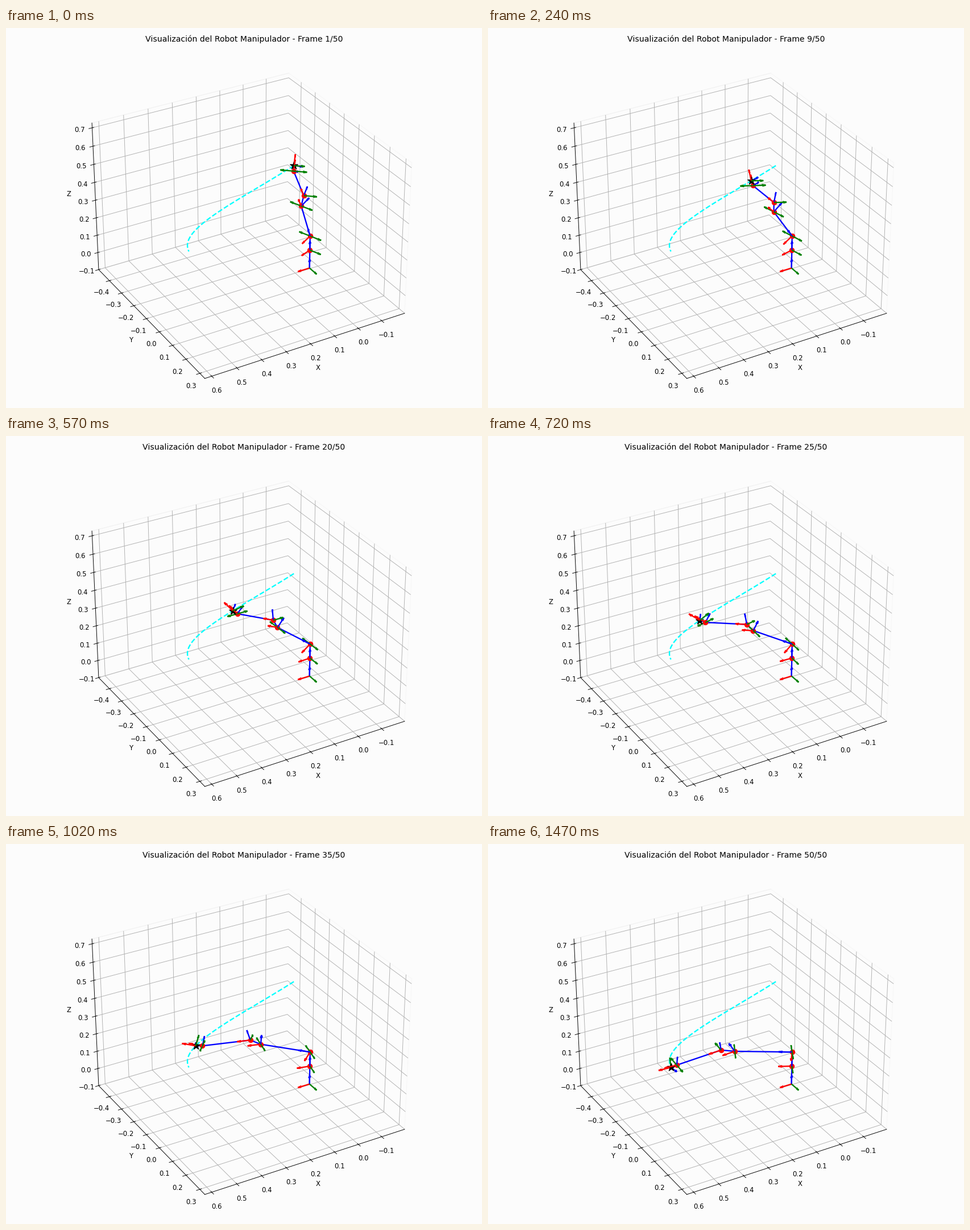
Recreate the animation shown at these times as a matplotlib script. Size 837 by 669 pixels, loop 1.5 s.

```python
import numpy as np
import matplotlib.pyplot as plt
from matplotlib.animation import FuncAnimation
from matplotlib.ticker import MultipleLocator

DPI = 83.7
W, H = 837, 669
STEPS = 50
BACK = "#fcfcfc"
ARROW = 0.05
COLORS = ("red", "green", "blue")

# Each joint: rotation axis, offset from the previous joint (m)
JOINTS = [
    ("z", (0, 0, 0.103)),
    ("y", (0, 0, 0.08)),
    ("y", (0, 0, 0.21)),
    ("x", (0.0415, 0, 0.03)),
    ("y", (0.18, 0, 0)),
    ("x", (0.0237, 0, -0.0055)),
]
START = np.radians([21.4, 15.7, -85.5, 20, -56, -21])
END = np.radians([-27, 86.5, -60.7, 84, -8, 73.5])


def rotation(axis, angle):
    c, s = np.cos(angle), np.sin(angle)
    if axis == "x":
        return np.array([[1, 0, 0], [0, c, -s], [0, s, c]])
    if axis == "y":
        return np.array([[c, 0, s], [0, 1, 0], [-s, 0, c]])
    return np.array([[c, -s, 0], [s, c, 0], [0, 0, 1]])


def pose(step):
    """Origins and orientations of the base and all joints."""
    angles = START + (END - START) * step / (STEPS - 1)
    point, rot = np.zeros(3), np.eye(3)
    points, rots = [point], [rot]
    for (axis, offset), angle in zip(JOINTS, angles):
        point = point + rot @ np.array(offset)
        rot = rot @ rotation(axis, angle)
        points.append(point)
        rots.append(rot)
    return np.array(points), rots


fig = plt.figure(figsize=(W / DPI, H / DPI + 1e-9), dpi=DPI, facecolor=BACK)
ax = fig.add_subplot(projection="3d", facecolor=BACK)
ax.view_init(elev=30, azim=60)
for axis in (ax.xaxis, ax.yaxis, ax.zaxis):
    axis.pane.set_facecolor(BACK)
    axis.set_major_locator(MultipleLocator(0.1))

path = np.array([pose(k)[0][-1] for k in range(STEPS)])
ax.plot(*path.T, color="cyan", linestyle="--", linewidth=2)
arm, = ax.plot([], [], [], color="blue", linewidth=2)

ax.set_xlim(-0.1992, 0.6272)
ax.set_ylim(-0.4906, 0.3358)
ax.set_zlim(-0.1003, 0.7261)
ax.set_xlabel("X")
ax.set_ylabel("Y")
ax.set_zlabel("Z")

moving = []


def arrow(point, direction, color):
    moving.append(ax.quiver(*point, *direction, length=ARROW, color=color,
                            linewidth=2))


def draw(step):
    while moving:
        moving.pop().remove()
    points, rots = pose(step)
    arm.set_data_3d(*points.T)

    for point in points[1:-1]:
        moving.append(ax.scatter(*point, color="red", s=50))
    for point, rot in zip(points, rots):
        for direction, color in zip(rot.T, COLORS):
            arrow(point, direction, color)
    # Pitch joints also show their negative turning axis
    for (axis, _), point, rot in zip(JOINTS, points[1:], rots[1:]):
        if axis == "y":
            arrow(point, -rot[:, 1], "green")
    moving.append(ax.scatter(*points[-1], color="black", marker="*", s=150))

    ax.set_title("Visualización del Robot Manipulador - "
                 f"Frame {step + 1}/{STEPS}")
    return moving


draw(0)
fig.tight_layout()
anim = FuncAnimation(fig, draw, frames=STEPS, interval=30, repeat=True,
                     repeat_delay=0, blit=False)
plt.show()
```
